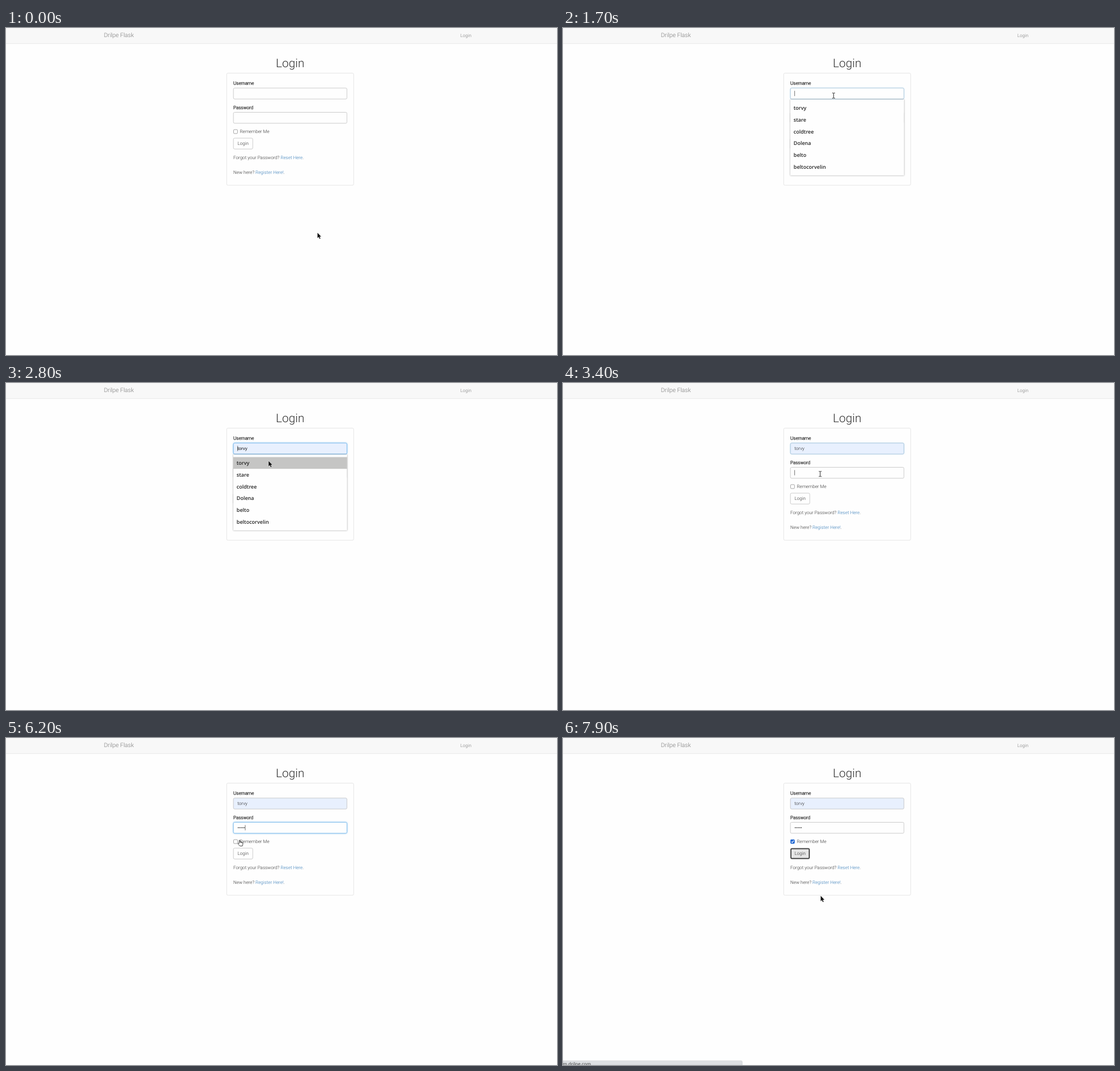
An HTML page that plays this animation: 972x576 px, repeating every 8 s.

```html
<!DOCTYPE html>
<html lang="en">
<head>
<meta charset="utf-8">
<title>Login</title>
<style>
  html, body { margin: 0; width: 100%; height: 100%; overflow: hidden; background: #fefefe; }
  svg { display: block; }
  text { font: 300 8.08px Roboto, sans-serif; fill: #333; text-rendering: geometricPrecision; white-space: pre; }
  .nav { fill: #777; }
  .brand { font-size: 10.39px; }
  .title { font-size: 20.8px; text-anchor: middle; }
  .label { stroke: #333; stroke-width: .34px; }
  .link { fill: #337ab7; }
  .box { fill: #fefefe; stroke: #bbb; stroke-width: .75px; }
  .panel { stroke: #ddd; }
  .filled { fill: #e8f0fe; }
  .fading { stroke: #94b8d2; filter: drop-shadow(0 0 1px rgba(102, 175, 233, .3)); }
  .focus { stroke: #66afe9; filter: drop-shadow(0 0 1.8px rgba(102, 175, 233, .75)); }
  .value { fill: #222; }
  .preview { font: 400 8px "Liberation Sans", Arial, sans-serif; fill: #111; }
  .caret { fill: #333; }
  .menu text { font: 600 9px "Open Sans", "Noto Sans", sans-serif; fill: #222; }
  .menu .sheet { fill: #fefefe; filter: drop-shadow(0 .7px .9px rgba(0, 0, 0, .45)); }
  .check { fill: #fefefe; stroke: #767676; stroke-width: .65px; }
  .checked .check { fill: #2067d2; stroke: #2067d2; }
  .tick { fill: none; stroke: #fff; stroke-width: 1.1px; visibility: hidden; }
  .checked .tick { visibility: visible; }
  .hover .box { fill: #e6e6e6; stroke: #a4a4a4; }
  .ring { fill: none; stroke: #101010; stroke-width: 1.25px; visibility: hidden; }
  .pressed .ring { visibility: visible; }
  .status text { font: 400 8px "Open Sans", "Noto Sans", sans-serif; }
  .arrow { fill: #111; stroke: #fff; stroke-width: .9px; paint-order: stroke; }
  .beam { fill: none; stroke: #222; stroke-width: .95px; }
  .hand { fill: #fff; stroke: #111; stroke-width: .8px; stroke-linejoin: round; }
</style>
</head>
<body>
<svg width="972" height="576" viewBox="0 0 972 576">
  <rect width="972" height="27" fill="#f8f8f8"/>
  <rect y="26.9" width="972" height=".7" fill="#e2e2e2"/>
  <text class="nav brand" x="172.8" y="16.4">Drilpe Flask</text>
  <text class="nav" x="801.4" y="15.7">Login</text>

  <text class="title" x="501.2" y="68.8">Login</text>
  <rect class="box panel" x="389.3" y="79.5" width="224" height="197.5" rx="2.3"/>

  <text class="label" x="401" y="99.8">Username</text>
  <rect id="user" class="box" x="401.2" y="105.8" width="200.2" height="19.3" rx="2.2"/>
  <text id="name" x="408.3" y="118">torvy</text>

  <text class="label" x="401" y="142.5">Password</text>
  <rect id="pass" class="box" x="401.2" y="148.5" width="200.2" height="19.3" rx="2.2"/>
  <g id="dots" fill="#444"></g>
  <rect id="caret" class="caret" width=".7" height="9.2"/>

  <g id="remember">
    <rect class="check" x="401.5" y="179" width="6.9" height="6.9" rx="1.3"/>
    <path class="tick" d="M402.9 182.6l1.5 1.5 2.7-3.4"/>
    <text x="412.4" y="185.2">Remember Me</text>
  </g>

  <g id="button">
    <rect class="box" x="401.2" y="194" width="34.1" height="19.2" rx="2.2"/>
    <rect class="ring" x="402.2" y="195" width="32.1" height="17.2" rx="1.4"/>
    <text x="418.2" y="206.4" text-anchor="middle">Login</text>
  </g>

  <text x="401" y="230.8">Forgot your Password? <tspan class="link" x="484.3">Reset Here</tspan>.</text>
  <text x="401" y="256.7">New here? <tspan class="link" x="440">Register Here!</tspan>.</text>

  <g id="menu" class="menu">
    <rect class="sheet" x="401" y="126" width="200.7" height="133.7"/>
    <rect id="row" x="401" y="130.5" width="200.7" height="20.7" fill="#c5c5c4"/>
  </g>

  <g id="status" class="status">
    <path d="M0 568.4H314a2.3 2.3 0 0 1 2.3 2.3V576H0Z" fill="#dcdfe2" stroke="#cdd0d3" stroke-width=".6"/>
    <text x="-.3" y="577.2">m.drilpe.com</text>
  </g>

  <g id="cursor">
    <path class="arrow" d="M0 0V9.4L2.2 7.4 3.7 10.9 5.2 10.2 3.7 6.9H6.5Z"/>
    <path class="beam" d="M-2.4-4.5H-.6L0-4 .6-4.5H2.4M0-4V4M-2.4 4.5H-.6L0 4 .6 4.5H2.4"/>
    <path class="hand" d="M-.8 6V1a.9.9 0 0 1 1.8 0V4a.8.8 0 0 1 1.7 0V4.5a.8.8 0 0 1 1.6 0V5a.75.75 0 0 1 1.5 .2V7.6L5 10.3H.6L-2.7 6.7a.8.8 0 0 1 1.2-1.1Z"/>
  </g>
</svg>
<script>
const LOOP = 8000, STEP = 100, DOT = 2.65;
const $ = id => document.getElementById(id);
const show = (el, on) => el.setAttribute('visibility', on ? 'inherit' : 'hidden');
const add = (parent, tag, attrs) => {
  const el = document.createElementNS('http://www.w3.org/2000/svg', tag);
  for (const key in attrs) el.setAttribute(key, attrs[key]);
  return parent.appendChild(el);
};

['torvy', 'stare', 'coldtree', 'Dolena', 'belto', 'beltocorvelin'].forEach((word, i) => {
  add($('menu'), 'text', { x: 406.8, y: 144.2 + i * 20.75 }).textContent = word;
});
for (let i = 0; i < 5; i++) add($('dots'), 'circle', { cx: 409.7 + i * DOT, cy: 157.9, r: 0.9 });

// time, x, y of the pointer
const path = [
  [0, 549.5, 360.7], [500, 549.5, 360.7], [1000, 478, 166.7], [1100, 478, 166.7],
  [1500, 477.4, 119], [2200, 477.4, 119], [2400, 471.5, 125.4], [2500, 467, 133],
  [2600, 467, 133], [2900, 462, 139], [3300, 453.7, 160.2], [5700, 453.7, 160.2],
  [5900, 452.5, 174], [6300, 404.5, 181], [6800, 404.5, 181], [7000, 411, 197.8],
  [7600, 411, 197.8], [7900, 454.6, 278], [LOOP, 454.6, 278]
];

function pointer(t) {
  const i = path.findIndex(p => p[0] > t);
  const [t0, x0, y0] = path[i - 1], [t1, x1, y1] = path[i];
  const u = (t - t0) / (t1 - t0), k = u * u * (3 - 2 * u);
  return [x0 + (x1 - x0) * k, y0 + (y1 - y0) * k];
}

function draw(t) {
  const within = (a, b) => t >= a && t < b;
  const [x, y] = pointer(t);
  const over = (l, top, r, b) => x > l && x < r && y > top && y < b;
  const focus = (a, b) => within(a + 100, b) ? ' focus' : within(a, b + 100) ? ' fading' : '';

  const hover = over(401, 194, 435.5, 213.4);
  const field = over(401, 105.5, 601.6, 125.2) || over(401, 148.2, 601.6, 168);
  const kind = field ? 1 : hover || over(408.8, 177, 465, 188) ? 2 : 0;
  [...$('cursor').children].forEach((el, i) => show(el, i === kind));
  $('cursor').setAttribute('transform', `translate(${x} ${y})`);

  $('user').setAttribute('class', 'box' + (t >= 2400 ? ' filled' : '') + focus(1700, 3400));
  $('pass').setAttribute('class', 'box' + (within(3500, 6700) ? ' focus' : ''));
  $('name').setAttribute('class', t < 2900 ? 'preview' : 'value');
  show($('name'), t >= 2400);
  show($('menu'), within(1700, 2900));
  show($('row'), within(2400, 2900));

  const typed = t < 4300 ? 0 : t < 4600 ? 1 : t < 5200 ? 2 : t < 5800 ? 4 : 5;
  [...$('dots').children].forEach((el, i) => show(el, i < typed));

  const inPass = t >= 3400;
  show($('caret'), within(1700, 6700) && !within(4000, 4300));
  $('caret').setAttribute('x', inPass ? 408.4 + typed * DOT : t < 2900 ? 408.4 : 426.9);
  $('caret').setAttribute('y', inPass ? 153.4 : 110.7);

  $('remember').setAttribute('class', t >= 6700 ? 'checked' : '');
  $('button').setAttribute('class', (hover || t >= 7300 ? 'hover' : '') + (t >= 7300 ? ' pressed' : ''));
  show($('status'), t >= 7400);
}

const start = performance.now();
function tick() {
  const t = (performance.now() - start) % LOOP;
  draw(Math.floor(t / STEP) * STEP);
  requestAnimationFrame(tick);
}
tick();
</script>
</body>
</html>
```
